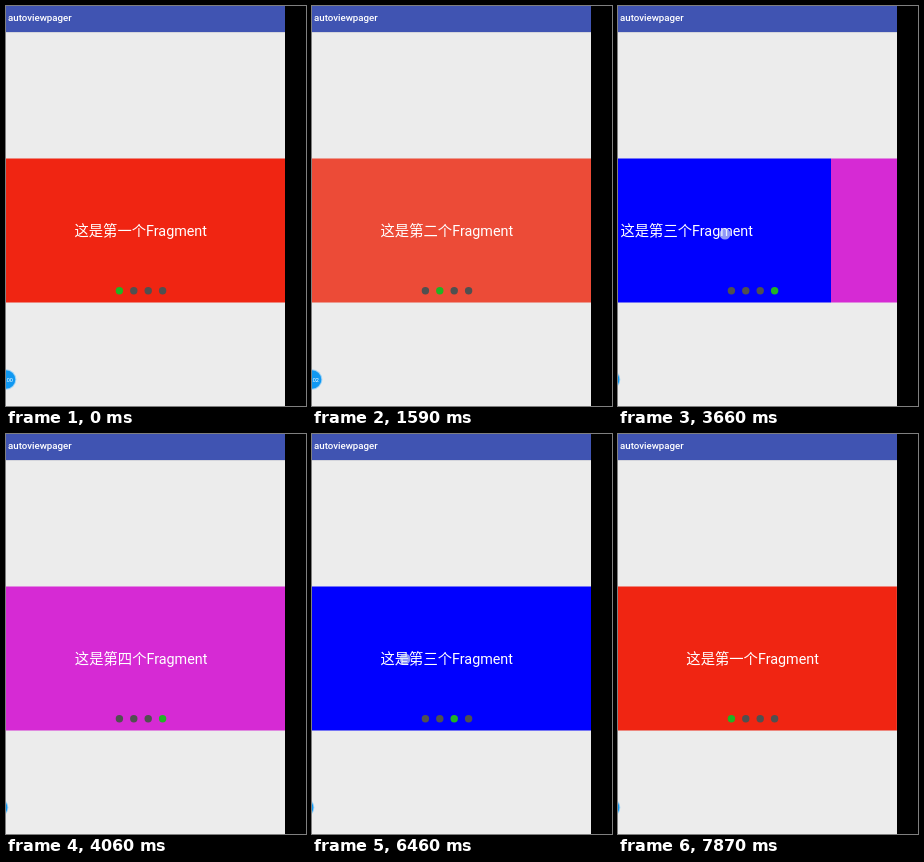
These frames come from a looping animation (300x400 px, 8000 ms). An HTML page:

```html
<!DOCTYPE html>
<html lang="zh-CN">
<head>
<meta charset="utf-8">
<title>autoviewpager</title>
<style>
  html, body { margin: 0; width: 100%; height: 100%; overflow: hidden; background: #ececec; }
  svg { display: block; width: 300px; height: 400px; }
  text { fill: #fff; font-family: Roboto, "Noto Sans CJK SC", "Noto Sans CJK", sans-serif; }
</style>
</head>
<body>
<svg viewBox="0 0 300 400">
  <rect width="300" height="400" fill="#ececec"/>
  <rect y="26" width="279" height="1" fill="#d4d5dc"/>
  <rect width="279" height="26" fill="#4054b2"/>
  <text x="2" y="15" font-size="9.7" font-weight="500">autoviewpager</text>
  <g id="pages"></g>
  <g id="dots"></g>
  <circle id="touch" r="5.5" fill="#dce8f4" fill-opacity=".65"/>
  <g id="bubble">
    <circle cy="373.5" r="10.3" fill="#9fd3f5"/>
    <circle cy="373.5" r="9.3" fill="#0f98f2"/>
    <text id="clock" y="375.5" font-size="5.5" text-anchor="middle"></text>
  </g>
  <rect x="279" width="21" height="400"/>
</svg>
<script>
const LOOP = 8000, WIDTH = 288.6, CENTER = 134.7;
const COLORS = ['#f02512', '#ec4b37', '#0000ff', '#d62ad4'];
const $ = id => document.getElementById(id);
const clamp = v => Math.min(1, Math.max(0, v));
const settle = u => 1 - (1 - clamp(u)) ** 5;

$('pages').innerHTML = COLORS.map((color, i) => `
  <g transform="translate(${i * WIDTH})">
    <rect x="${CENTER - WIDTH / 2}" y="152.5" width="${WIDTH}" height="144" fill="${color}"/>
    <text x="${CENTER}" y="230" font-size="14.33" text-anchor="middle">这是第${'一二三四'[i]}个Fragment</text>
  </g>`).join('');
$('dots').innerHTML = COLORS.map((_, i) =>
  `<circle cx="${113.4 + i * 14.4}" cy="284.8" r="3.7"/>`).join('');
const dots = [...$('dots').children];

// Automatic page turns
const turns = [{ start: 960, to: 1 }, { start: 1980, to: 2 }];
// Finger swipes: touch down, drag, release, then the page settles
const swipes = [
  { down: 3280, drag: 3520, up: 3660, x: 187, to: 3, dir: 1 },
  { down: 5640, drag: 5660, up: 5800, x: 90, to: 2, dir: -1 },
  { down: 6460, drag: 6480, up: 6620, x: 93, to: 1, dir: -1 },
  { down: 7270, drag: 7290, up: 7430, x: 85, to: 0, dir: -1 }
];

function state(t) {
  let pos = 0, page = 0, touch = null;
  for (const { start, to } of turns) {
    if (t < start) break;
    pos = to - 1 + settle((t - start) / 800);
    page = to;
  }
  for (const { down, drag, up, x, to, dir } of swipes) {
    if (t < down) break;
    const moved = 80 * clamp((t - drag) / (up - drag)) ** 1.5;
    const pulled = Math.max(0, moved - 16) / WIDTH;
    pos = to - dir * (1 - pulled) * (1 - settle((t - up) / 560));
    if (t >= up) page = to;
    touch = t <= up + 20 ? { x: x - dir * moved, y: 225 + 3 * moved / 80 } : null;
  }
  return { pos, page, touch };
}

function draw(now) {
  const t = now % LOOP;
  const { pos, page, touch } = state(t);
  $('pages').setAttribute('transform', `translate(${-pos * WIDTH})`);
  dots.forEach((dot, i) => dot.setAttribute('fill', i === page ? '#20b424' : '#505050'));
  $('touch').setAttribute('visibility', touch ? 'visible' : 'hidden');
  if (touch) {
    $('touch').setAttribute('cx', touch.x);
    $('touch').setAttribute('cy', touch.y);
  }
  $('bubble').setAttribute('transform', `translate(${-8 * clamp((t - 2570) / 240)})`);
  $('clock').textContent = '00:0' + Math.floor((t + 830) / 1000);
}

const begin = performance.now();
function tick() {
  draw(performance.now() - begin);
  requestAnimationFrame(tick);
}
tick();
</script>
</body>
</html>
```
